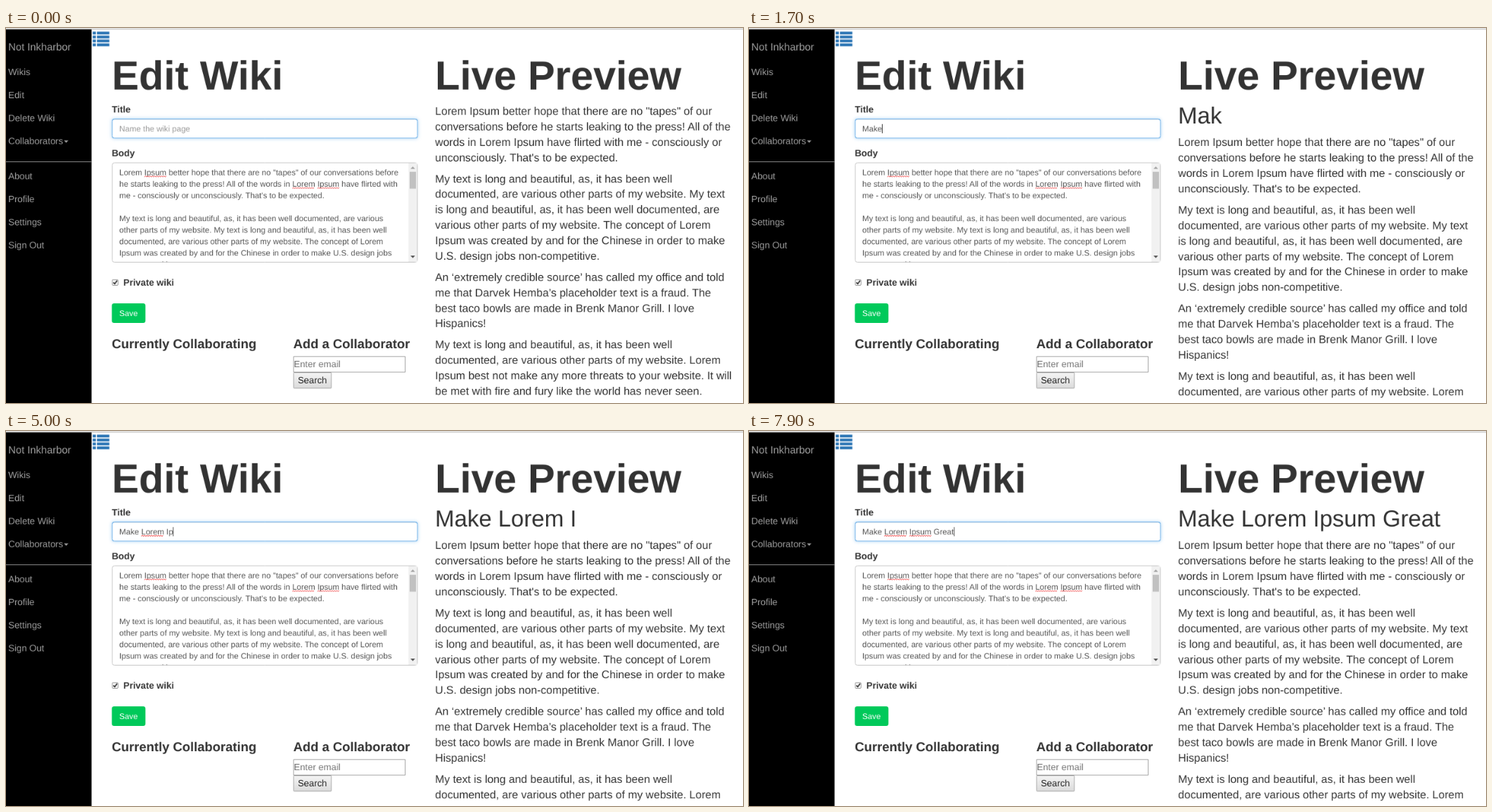
Write an HTML page with a canvas that moves like this. It is 1048 px wide and 534 px high and loops after 8 s.

```html
<!DOCTYPE html>
<html lang="en">
<head>
<meta charset="utf-8">
<title>Edit Wiki</title>
<style>
  html, body { margin: 0; width: 100%; height: 100%; overflow: hidden; background: #fff; }
  canvas { display: block; width: 1048px; height: 534px; }
</style>
</head>
<body>
<canvas id="stage" width="1048" height="534"></canvas>
<script>
const LOOP = 8000;
const SCALE = 1048 / 1280;
const LEFT = 183.75, RIGHT = 745.3, FIELD_X = 196.8;
const BOX_X = 184, BOX_W = 531;
const HEADING = 70.6, SUBHEADING = 40.2;
const TITLE = 'Make Lorem Ipsum Great';

// Moment each character shows up in the field and in the preview.
const TYPED = [900, 1200, 1500, 1700, 2100, 2700, 3000, 3300, 3600, 3900, 4100,
  4600, 5000, 5600, 5800, 6100, 6300, 6800, 7000, 7100, 7400, 7800];
const SHOWN = [900, 1300, 1600, 1800, 2100, 2700, 3100, 3400, 3600, 4000, 4100,
  4700, 5100, 5700, 5900, 6200, 6300, 6800, 7100, 7200, 7500, 7900];
const CARET_ON = 300;
const MISSPELLED = [['Lorem', 4200], ['Ipsum', 6300]];

const BODY = [
  'Lorem Ipsum better hope that there are no "tapes" of our conversations before',
  'he starts leaking to the press! All of the words in Lorem Ipsum have flirted with',
  "me - consciously or unconsciously. That's to be expected.",
  '',
  'My text is long and beautiful, as, it has been well documented, are various',
  'other parts of my website. My text is long and beautiful, as, it has been well',
  'documented, are various other parts of my website. The concept of Lorem',
  'Ipsum was created by and for the Chinese in order to make U.S. design jobs',
  'non-competitive.'
];

const PREVIEW = [
  ['Lorem Ipsum better hope that there are no "tapes" of our',
   'conversations before he starts leaking to the press! All of the',
   'words in Lorem Ipsum have flirted with me - consciously or',
   "unconsciously. That's to be expected."],
  ['My text is long and beautiful, as, it has been well',
   'documented, are various other parts of my website. My text',
   'is long and beautiful, as, it has been well documented, are',
   'various other parts of my website. The concept of Lorem',
   'Ipsum was created by and for the Chinese in order to make',
   'U.S. design jobs non-competitive.'],
  ['An ‘extremely credible source’ has called my office and told',
   'me that Darvek Hemba’s placeholder text is a fraud. The',
   'best taco bowls are made in Brenk Manor Grill. I love',
   'Hispanics!'],
  ['My text is long and beautiful, as, it has been well',
   'documented, are various other parts of my website. Lorem',
   'Ipsum best not make any more threats to your website. It will',
   'be met with fire and fury like the world has never seen.']
];

const screen = document.getElementById('stage').getContext('2d');
screen.imageSmoothingQuality = 'high';

// The page is laid out at 1280 px and shown scaled down.
const page = document.createElement('canvas');
page.width = 1280;
page.height = 652;
const ctx = page.getContext('2d');
ctx.textRendering = 'geometricPrecision';

function setFont(size, bold) {
  ctx.font = `${bold ? 'bold ' : ''}${size}px "Liberation Sans", Arial, sans-serif`;
}

function text(str, x, y, size, color = '#333', bold = false) {
  setFont(size, bold);
  ctx.fillStyle = color;
  ctx.fillText(str, x, y);
}

function rect(x, y, w, h, color) {
  ctx.fillStyle = color;
  ctx.fillRect(x, y, w, h);
}

function roundBox(x, y, w, h, radius, fill, stroke) {
  ctx.beginPath();
  ctx.roundRect(x, y, w, h, radius);
  ctx.fillStyle = fill;
  ctx.fill();
  if (stroke) {
    ctx.strokeStyle = stroke;
    ctx.lineWidth = 1;
    ctx.stroke();
  }
}

function triangle(cx, y, half, height, color) {
  ctx.beginPath();
  ctx.moveTo(cx - half, y);
  ctx.lineTo(cx + half, y);
  ctx.lineTo(cx, y + height);
  ctx.fillStyle = color;
  ctx.fill();
}

// Spell-check zigzag below a word of a 14 px line.
function squiggle(line, word, x, baseline) {
  setFont(14);
  const start = x + ctx.measureText(line.slice(0, line.indexOf(word))).width;
  const end = start + ctx.measureText(word).width;
  ctx.beginPath();
  for (let px = start, i = 0; px <= end; px += 2, i++) {
    ctx.lineTo(px, baseline + (i % 2 ? 1.5 : 3));
  }
  ctx.strokeStyle = '#e22';
  ctx.lineWidth = 1;
  ctx.stroke();
}

function drawSidebar() {
  const gray = '#9d9d9d';
  rect(0, 2, 148.6, 650, '#000');
  text('Not Inkharbor', 4, 39, 18, gray);
  ['Wikis', 'Edit', 'Delete Wiki', 'Collaborators'].forEach((s, i) => text(s, 4, 82 + i * 40, 16, gray));
  triangle(104.5, 195.5, 4, 4, gray);
  rect(0, 232, 148.6, 1, '#a0a0a0');
  ['About', 'Profile', 'Settings', 'Sign Out'].forEach((s, i) => text(s, 4, 263 + i * 40, 16, gray));
}

function drawListIcon() {
  for (let i = 0; i < 4; i++) {
    const y = 6.2 + i * 6.9;
    rect(150.5, y, 5.5, 5, '#337ab7');
    rect(158, y, 21.5, 5, '#337ab7');
  }
}

function drawTitleField(time, typed) {
  text('Title', LEFT, 147, 16, '#333', true);
  ctx.save();
  ctx.shadowColor = 'rgba(102,175,233,0.6)';
  ctx.shadowBlur = 6;
  roundBox(BOX_X, 158, BOX_W, 34, 4, '#5fa8e6');
  ctx.restore();
  roundBox(BOX_X + 0.5, 158.5, BOX_W - 1, 33, 4, '#fff', '#5fa8e6');
  rect(BOX_X + 3, 159, BOX_W - 6, 1, 'rgba(0,0,0,0.075)');

  if (typed) text(typed, FIELD_X, 180, 14, '#555');
  else text('Name the wiki page', FIELD_X, 180, 14, '#999');
  for (const [word, since] of MISSPELLED) {
    if (time >= since) squiggle(TITLE, word, FIELD_X, 180);
  }
  if (time >= CARET_ON) {
    setFont(14);
    rect(Math.round(FIELD_X + ctx.measureText(typed).width), 167, 1, 16, '#333');
  }
}

function drawBodyField() {
  text('Body', LEFT, 223, 16, '#333', true);
  roundBox(BOX_X + 0.5, 234.5, BOX_W - 1, 173, 4, '#fff', '#bbb');
  ctx.save();
  ctx.beginPath();
  ctx.rect(BOX_X + 1, 235, BOX_W - 2, 172);
  ctx.clip();
  BODY.forEach((line, i) => text(line, FIELD_X, 256 + i * 20, 14, '#555'));
  ctx.restore();
  squiggle(BODY[0], 'Ipsum', FIELD_X, 256);
  squiggle(BODY[1], 'Lorem', FIELD_X, 276);
  squiggle(BODY[1], 'Ipsum', FIELD_X, 276);

  rect(699, 235, 15, 172, '#f1f1f1');
  rect(701, 250, 11, 29.5, '#c1c1c1');
  triangle(706.5, 245, 4, -4, '#a3a3a3');
  triangle(706.5, 396, 4, 4, '#505050');
}

function drawCheckbox() {
  roundBox(184.5, 437.5, 10, 10, 1.5, '#f3f3f3', '#8c8c8c');
  ctx.beginPath();
  ctx.moveTo(186.5, 442.5);
  ctx.lineTo(188.8, 445);
  ctx.lineTo(193, 439.3);
  ctx.strokeStyle = '#333';
  ctx.lineWidth = 2;
  ctx.stroke();
  text('Private wiki', LEFT + 20, 448, 16, '#333', true);
}

function drawCollaborators() {
  text('Currently Collaborating', LEFT, 557, 22.5, '#333', true);
  text('Add a Collaborator', 499, 557, 22.5, '#333', true);
  roundBox(499.5, 571.5, 194, 27, 0, '#fff', '#8a8a8a');
  text('Enter email', 500, 590, 16, '#757575');
  const shade = ctx.createLinearGradient(0, 600, 0, 627);
  shade.addColorStop(0, '#f4f4f4');
  shade.addColorStop(1, '#dadada');
  roundBox(499.5, 599.5, 65.5, 27, 1, shade, '#999');
  text('Search', 506.7, 618, 16, '#222');
}

function drawPreview(heading) {
  text('Live Preview', RIGHT, 107, HEADING, '#333', true);
  let y = 151;
  if (heading) {
    text(heading, RIGHT, 166, SUBHEADING);
    y += SUBHEADING * 1.1 + 10.2;
  }
  for (const paragraph of PREVIEW) {
    for (const line of paragraph) {
      text(line, RIGHT, Math.round(y), 19.2);
      y += 26.88;
    }
    y += 10;
  }
}

function countAt(times, time) {
  return times.filter(t => t <= time).length;
}

function draw(time) {
  rect(0, 0, 1280, 652, '#fff');
  drawSidebar();
  rect(0, 0, 1280, 1.3, '#f2f1f0');
  rect(0, 1.3, 1280, 1.2, '#b4b4b4');
  drawListIcon();
  text('Edit Wiki', LEFT, 107, HEADING, '#333', true);
  drawTitleField(time, TITLE.slice(0, countAt(TYPED, time)));
  drawBodyField();
  drawCheckbox();
  roundBox(LEFT, 479, 58.5, 34, 4, '#00c95a');
  text('Save', FIELD_X, 501, 14, '#fff');
  drawCollaborators();
  drawPreview(TITLE.slice(0, countAt(SHOWN, time)));
  screen.drawImage(page, 0, 0, 1280 * SCALE, 652 * SCALE);
}

const CHANGES = [CARET_ON, ...TYPED, ...SHOWN, ...MISSPELLED.map(m => m[1])];
const start = performance.now();
let drawnState = -1;

function tick() {
  const time = (performance.now() - start) % LOOP;
  const state = countAt(CHANGES, time);
  if (state !== drawnState) {
    draw(time);
    drawnState = state;
  }
  requestAnimationFrame(tick);
}
tick();
</script>
</body>
</html>
```
